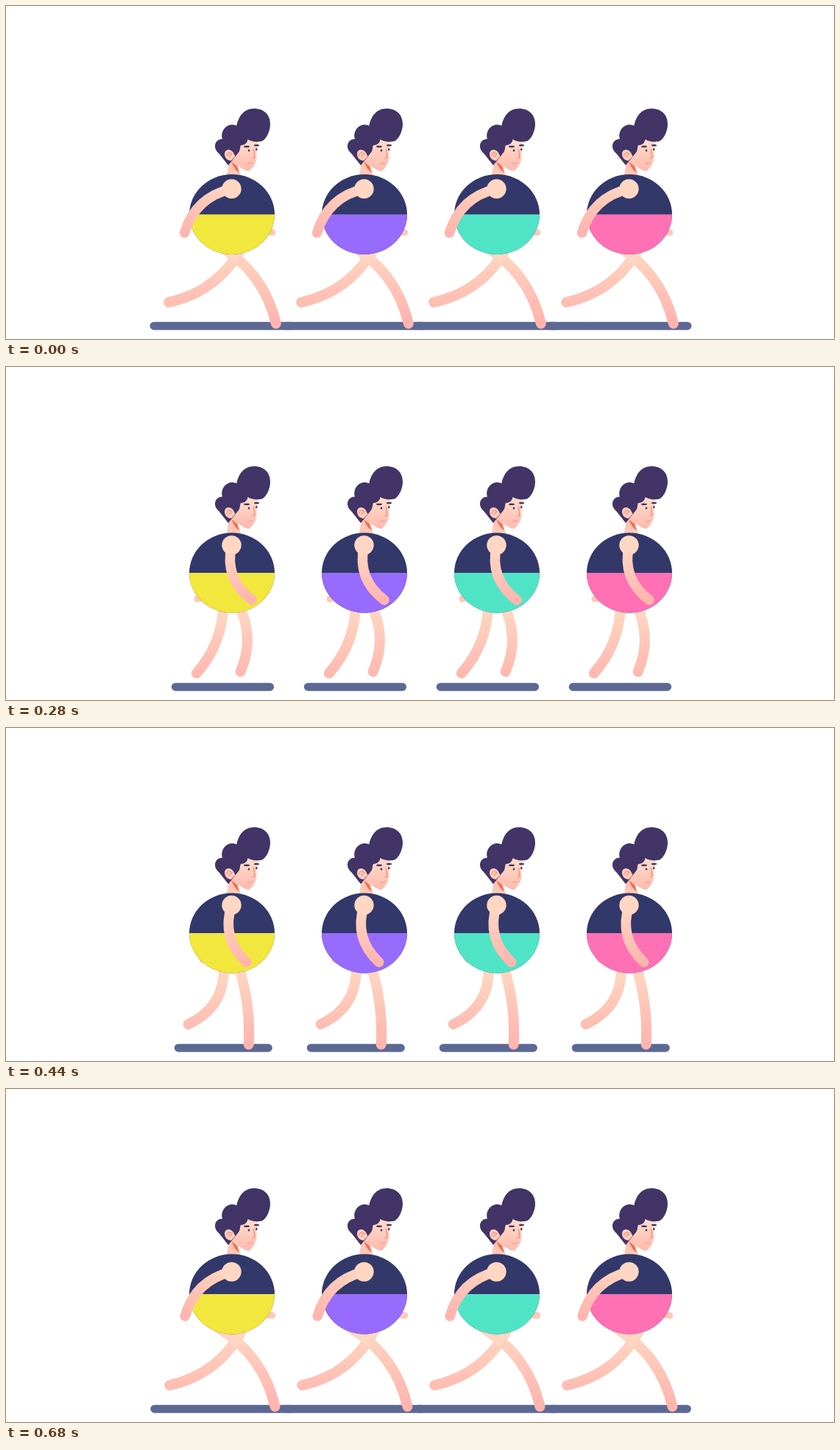
An HTML page with a canvas that plays this animation: 1125 by 453 pixels, repeating every 0.72 s.

```html
<!DOCTYPE html>
<html lang="en">
<head>
<meta charset="utf-8">
<title>Walkers</title>
<style>
  html, body { margin: 0; width: 100%; height: 100%; overflow: hidden; background: #fff; }
  canvas { display: block; width: 1125px; height: 453px; }
</style>
</head>
<body>
<canvas id="stage"></canvas>
<script>
const W = 1125, H = 453, LOOP = 720, STEP = 40, GAP = 180;
const SHIRTS = ['#f2e73c', '#976bfb', '#50e4c6', '#ff70b5'];
const HAIR = '#423466', NAVY = '#32386a', FLOOR = '#5c6994';
const PEACH = '#ffd7c2', PINK = '#ffb5ae', ORANGE = '#f0704f';
const GROUND = 432, HIP_Y = 325, MID_X = 307;

const HAIR_PATH = new Path2D(`M313.5 157.5C316 146 323 135 337 135C351 135 359 144 359 156
  C359 166 353 180 344.5 180C338 180.5 332 179.5 328.5 177C328 181 325 185 319 185
  C317.5 187 319 192 315 196L302 212.3L290 197C287 194 284 191 284 186
  C284 180 289 176 294 176.5C291 167 298 157 307 157C309.5 157 312 157.5 313.5 158.5Z`);
const FACE_PATH = new Path2D(`M306 182L342 176C342 184 341.5 189 340.5 193L340.5 202
  C340 209 335 216 330.5 220C324 219.5 317 215 309 207L304 196Z`);
const NECK_PATH = new Path2D('M305 198L299 230L320 230L314 209Z');
const NECK_SHADE = new Path2D('M306.5 207.5L314 213.5L317 222.5Q310 218 306.5 207.5Z');
const EAR_PATH = new Path2D('M297 197C297 190 305 189 309 195L311.5 200L306 206C301 206 297 202 297 197Z');

const canvas = document.getElementById('stage');
const g = canvas.getContext('2d');
const ratio = window.devicePixelRatio || 1;
canvas.width = W * ratio;
canvas.height = H * ratio;

const clamp = v => Math.min(1, Math.max(0, v));
const smooth = u => u * u * (3 - 2 * u);
const peak = (t, at, width) => Math.max(0, 1 - Math.abs(t - at) / width);
const wave = t => Math.cos(t / LOOP * Math.PI * 2);

// Falls from 1 to 0 at the turn, then rises back to 1 near the loop's end.
function swing(t, turn) {
  const rest = 20;
  if (t < turn) return 1 - smooth(((t + rest) / (turn + rest)) ** 1.3);
  return smooth(clamp((t - turn) / (LOOP - rest - turn)));
}

function fade(y1, y2, from = PEACH, to = PINK, x1 = 0, x2 = 0) {
  const f = g.createLinearGradient(x1, y1, x2, y2);
  f.addColorStop(0, from);
  f.addColorStop(1, to);
  return f;
}

function ellipse(x, y, rx, ry, fill, end = Math.PI * 2) {
  g.beginPath();
  g.ellipse(x, y, rx, ry, 0, 0, end);
  g.fillStyle = fill;
  g.fill();
}

function fill(path, color) {
  g.fillStyle = color;
  g.fill(path);
}

function line(path, color, width) {
  g.strokeStyle = color;
  g.lineWidth = width;
  g.stroke(new Path2D(path));
}

// The knee bows forward, more so for a raised or far-reaching foot.
function drawLeg(hipX, footX, lift) {
  const footY = GROUND - 29 * lift;
  const dx = footX - hipX, dy = footY - HIP_Y, len = Math.hypot(dx, dy);
  const bow = (2 + 0.155 * Math.max(0, dx) + 13 * lift) * 4 / 3;
  const along = s => [hipX + dx * s + dy / len * bow, HIP_Y + dy * s - dx / len * bow];
  g.beginPath();
  g.moveTo(hipX, HIP_Y);
  g.bezierCurveTo(...along(1 / 3), ...along(2 / 3), footX, footY);
  g.strokeStyle = fade(330, 428);
  g.lineWidth = 14;
  g.stroke();
}

function drawLegs(t) {
  const stride = 129 * swing(t, 370) - 56;
  const mid = 291 + 3 * wave(t);
  const hipFar = 293 - 0.07 * stride, hipNear = 318.5 + 0.05 * stride;
  drawLeg(hipFar, mid + stride, clamp(0.35 + 0.7 * wave(t - 430)));
  drawLeg(hipNear, mid - stride, clamp(0.8 + 0.75 * wave(t - 70)));

  // Thighs close up where the legs cross.
  const crotch = HIP_Y + Math.min(27, Math.max(0, stride));
  fill(new Path2D(`M${hipFar - 3} ${HIP_Y}H${hipNear + 3}L312 ${crotch}Z`), PEACH);
}

function drawBar(angle) {
  const reach = Math.abs(angle + 10);
  const mid = 299 - 0.15 * reach;
  const half = 47.5 + reach * (angle < -10 ? 1.22 : 0.55);
  line(`M${mid - half} 435.2H${mid + half}`, FLOOR, 11);
}

function drawFarHand(angle) {
  const s = Math.tanh(angle / 16);
  line(`M${MID_X} 302L${MID_X - 55 * s} ${312 + 4 * s}`, '#ffc8b8', 9.2);
}

function drawArm(angle) {
  const a = angle * Math.PI / 180, sin = Math.sin(a), cos = Math.cos(a);
  const len = 82 - 0.12 * angle, bow = 25.5;
  const x = MID_X - 0.5, y = 237.5 + 0.24 * Math.abs(angle);
  const hx = x + len * sin, hy = y + len * cos;
  const ex = (x + hx) / 2 - bow * cos, ey = (y + hy) / 2 + bow * sin;
  line(`M${x} ${y}Q${ex} ${ey} ${hx} ${hy}`, fade(y, hy, PEACH, PINK, x, hx), 13.5);
  ellipse(x, y, 13.2, 13.2, PEACH);
}

function drawHead() {
  fill(NECK_PATH, fade(208, 228, '#ffbfb1', '#ffcdbd'));
  fill(NECK_SHADE, ORANGE);
  fill(FACE_PATH, fade(180, 220, '#ffdcc9', '#ffb9ad'));
  fill(HAIR_PATH, HAIR);
  fill(EAR_PATH, '#ffcdbd');
  line('M299.8 199Q300.5 192.5 307 196.5M303 201Q303.5 198 306.5 197.5', ORANGE, 0.8);

  ellipse(327, 186.8, 4, 1.3, HAIR);
  ellipse(340.5, 185, 3.6, 1.3, HAIR);
  ellipse(330, 192, 1.3, 1.6, HAIR);
  ellipse(340.3, 190.6, 1.3, 1.6, HAIR);
  line('M336.5 190.5L338 201.5Q337.5 203 335 202.6', ORANGE, 0.9);
  line('M328.5 210Q332 211 335 208.6', '#f58f86', 1);
}

function drawWalker(shirt, t) {
  const angle = 29 - 76 * swing(t, 340);
  const dip = 4.5 * peak(t, 0, 120);
  const bodyY = 279 + dip + 2 * peak(t, 320, 80);

  drawBar(angle);
  drawLegs(t);
  drawFarHand(angle);

  g.save();
  g.translate(0, dip);
  drawHead();
  g.restore();

  ellipse(MID_X, bodyY, 58, 54.5, NAVY);
  ellipse(MID_X, bodyY, 58, 54.5, shirt, Math.PI);
  drawArm(angle);
}

function draw(now) {
  const t = Math.floor((now % LOOP) / STEP) * STEP;
  g.setTransform(ratio, 0, 0, ratio, 0, 0);
  g.lineCap = g.lineJoin = 'round';
  g.fillStyle = '#fff';
  g.fillRect(0, 0, W, H);
  for (const shirt of SHIRTS) {
    drawWalker(shirt, t);
    g.translate(GAP, 0);
  }
}

let start = null;
function tick(now) {
  if (start === null) start = now;
  draw(Math.max(0, now - start));
  requestAnimationFrame(tick);
}
draw(0);
requestAnimationFrame(tick);
</script>
</body>
</html>
```
